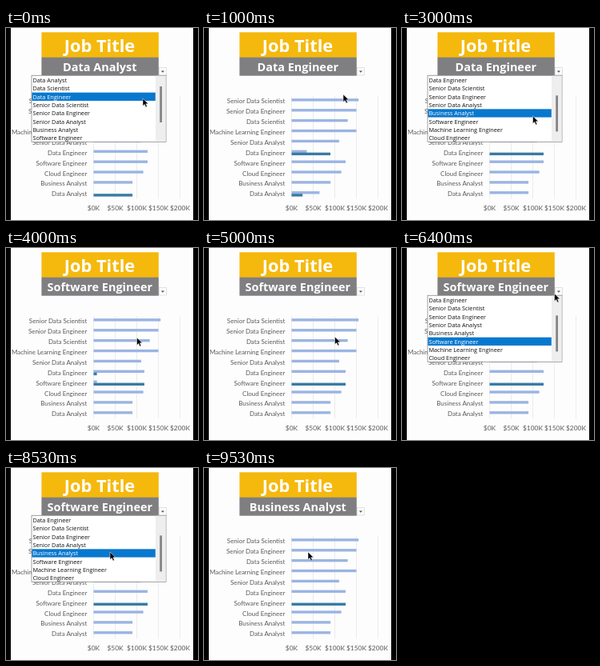
These frames come from a looping animation (240 px wide and 240 px high, 9590 ms). An HTML page:

```html
<!DOCTYPE html>
<html lang="en">
<head>
<meta charset="utf-8">
<title>Job title dashboard</title>
<style>
  html, body { margin: 0; width: 100%; height: 100%; overflow: hidden; background: #000; }
  svg { display: block; width: 100vw; height: 100vh; }
  .head { font: 700 14.45px "Open Sans", sans-serif; fill: #fff; text-anchor: middle; }
  .head.big { font-size: 21.8px; }
  .label { font: 7.95px Lato, sans-serif; fill: #595959; text-anchor: end; }
  .axis { font: 8.4px Lato, sans-serif; fill: #595959; text-anchor: middle; }
  .item { font: 7.3px "Open Sans", sans-serif; fill: #111; }
</style>
</head>
<body>
<svg id="stage" viewBox="0 0 240 240" xmlns="http://www.w3.org/2000/svg">
  <rect width="240" height="240" fill="#000"/>
  <rect x="6" width="228" height="240" fill="#fdfdfd"/>
  <rect x="44.4" y="5.3" width="146.4" height="31.7" fill="#f5b90d"/>
  <text class="head big" x="117" y="29.9">Job Title</text>
  <rect x="44.4" y="36.7" width="146.4" height="23" fill="#7f7f82"/>
  <text class="head" id="value" x="117.3" y="53.8"></text>
  <rect x="191.5" y="49.5" width="9" height="9.5" fill="#fcfcfc" stroke="#d6d6d6" stroke-width=".7"/>
  <path d="M193.8 53.4h4.2l-2.1 2.3z" fill="#555"/>
  <g id="chart"></g>
  <g id="list">
    <rect x="32" y="59.3" width="168" height="83" fill="#fff" stroke="#8a8a8a" stroke-width=".8"/>
    <rect x="187" y="59.8" width="12.5" height="82" fill="#eee"/>
    <rect id="thumb" x="192.2" width="2.8" height="45" fill="#858585"/>
    <rect id="hover" x="32.4" width="154.4" height="10.3"/>
  </g>
  <path id="cursor" d="M0 0V9.4L2.2 7.4L3.8 10.9L5.4 10.2L3.9 6.8H6.9Z" fill="#000" stroke="#fff" stroke-width=".5"/>
</svg>
<script>
const LOOP = 9590, FPS = 15, ROW = 10.33, TOP = 60, VISIBLE = 8;
const $ = id => document.getElementById(id);

const options = ['Data Analyst', 'Data Scientist', 'Data Engineer', 'Senior Data Scientist',
  'Senior Data Engineer', 'Senior Data Analyst', 'Business Analyst', 'Software Engineer',
  'Machine Learning Engineer', 'Cloud Engineer'];

// salary in thousands, top to bottom
const salaries = [['Senior Data Scientist', 155], ['Senior Data Engineer', 150],
  ['Data Scientist', 130], ['Machine Learning Engineer', 150], ['Senior Data Analyst', 110],
  ['Data Engineer', 125], ['Software Engineer', 125], ['Cloud Engineer', 115],
  ['Business Analyst', 90], ['Data Analyst', 90]];

const picks = [[-2000, 'Data Analyst'], [600, 'Data Engineer'],
  [3520, 'Software Engineer'], [9460, 'Business Analyst']];

// open, close, first visible option
const opened = [[-1000, 600, 0], [2060, 3520, 2], [6330, 9460, 2]];

// time, x, y
const path = [[0, 171, 88], [750, 171, 88], [1850, 194, 50], [2130, 194, 50],
  [2900, 163.5, 110], [3200, 163.5, 110], [3400, 163.5, 114], [3700, 163.5, 114],
  [4200, 163.5, 111], [5050, 163.5, 111], [6150, 190.5, 57], [6500, 190.5, 57],
  [7700, 130, 105], [LOOP, 130, 105]];

const ease = p => { p = Math.min(1, Math.max(0, p)); return p * p * (3 - 2 * p); };

function add(parent, tag, attrs, text) {
  const el = document.createElementNS('http://www.w3.org/2000/svg', tag);
  for (const key in attrs) el.setAttribute(key, attrs[key]);
  if (text) el.textContent = text;
  parent.appendChild(el);
  return el;
}
const set = (el, key, v) => el.setAttribute(key, v);

const AXIS = 109.5, SCALE = 0.54;
for (let k = 0; k <= 200; k += 50) {
  const x = AXIS + k * SCALE;
  add($('chart'), 'path', { d: `M${x} 85V213.5`, stroke: '#e2e4e8', 'stroke-width': .7 });
  add($('chart'), 'text', { class: 'axis', x, y: 228 }, `$${k}K`);
}
const bars = salaries.map(([name, k], i) => {
  const y = 91.6 + 12.88 * i;
  add($('chart'), 'text', { class: 'label', x: 101.3, y: y + 2.8 }, name);
  const bar = (dy, fill) => add($('chart'), 'rect', { x: AXIS, y: y + dy, height: 3.4, fill });
  return { name, width: k * SCALE, plain: bar(-3.4, '#9bb4e2'), strong: bar(-.3, '#387ba4') };
});
const items = Array.from({ length: VISIBLE }, (_, i) =>
  add($('list'), 'text', { class: 'item', x: 33.4, y: TOP + ROW * i + 7.9 }));

function pointer(t) {
  const i = Math.max(1, path.findIndex(p => p[0] >= t));
  const [t0, x0, y0] = path[i - 1], [t1, x1, y1] = path[i];
  const p = ease((t - t0) / (t1 - t0));
  return [x0 + (x1 - x0) * p, y0 + (y1 - y0) * p];
}

function drawChart(t) {
  const past = picks.filter(p => p[0] + 140 <= t);
  const now = past[past.length - 1], before = past[past.length - 2];
  const p = ease((t - now[0] - 140) / 400);
  for (const b of bars) {
    const share = (b.name === now[1] ? p : 0) + (before && b.name === before[1] ? 1 - p : 0);
    set(b.strong, 'width', b.width * share);
    set(b.plain, 'width', b.width * (1 - share));
  }
}

function drawList(t, value, y) {
  const open = opened.find(o => t >= o[0] && t < o[1]);
  set($('list'), 'visibility', open ? 'visible' : 'hidden');
  if (!open) return;
  const [start, , first] = open;
  const row = y > TOP ? Math.floor((y - TOP) / ROW) : options.indexOf(value) - first;
  const fresh = t - start < 60;
  set($('hover'), 'y', TOP + ROW * row);
  set($('hover'), 'fill', fresh ? '#3f88bd' : '#0878ce');
  set($('thumb'), 'y', 73 + 5.7 * first);
  items.forEach((el, i) => {
    el.textContent = options[first + i];
    el.style.fill = i !== row ? '#111' : fresh ? '#b5d3e8' : '#fff';
  });
}

function draw(ms) {
  const t = Math.floor((ms % LOOP + 5) * FPS / 1000) * 1000 / FPS;
  const value = picks.filter(p => p[0] <= t).pop()[1];
  const [x, y] = pointer(t);
  $('value').textContent = value;
  drawChart(t);
  drawList(t, value, y);
  set($('cursor'), 'transform', `translate(${x} ${y})`);
}

const begin = performance.now();
function tick() {
  draw(performance.now() - begin);
  requestAnimationFrame(tick);
}
tick();
</script>
</body>
</html>
```
